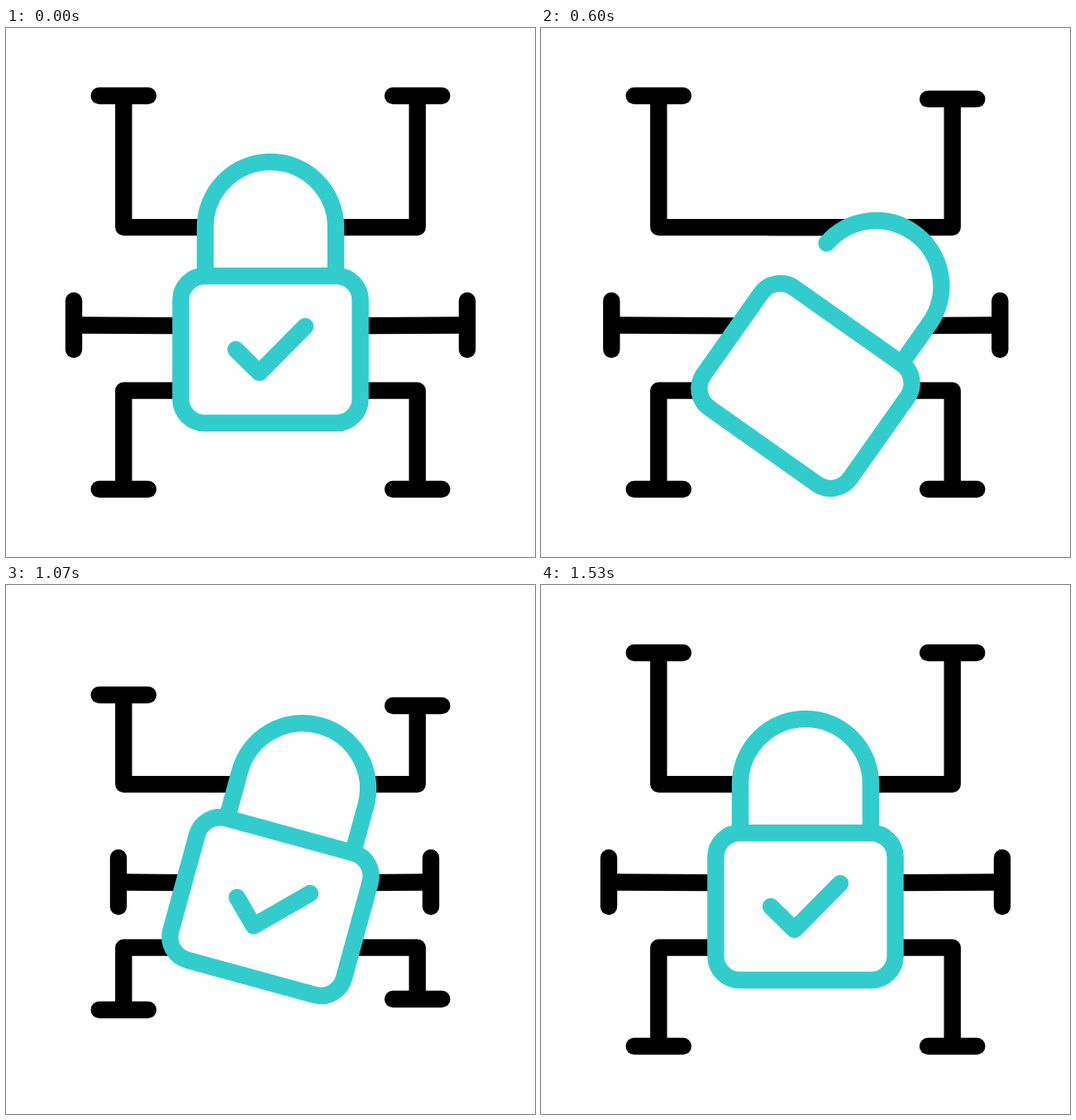
An HTML page with a canvas that plays this animation: 640 px wide and 640 px high, repeating every 1670 ms.

```html
<!DOCTYPE html>
<html lang="en">
<head>
<meta charset="utf-8">
<title>Swinging padlock</title>
<style>
  html, body { margin: 0; height: 100%; overflow: hidden; background: #fff; }
  canvas { display: block; width: 100vw; height: 100vh; object-fit: contain; }
</style>
</head>
<body>
<canvas id="stage" width="640" height="640"></canvas>
<script>
const ctx = document.getElementById("stage").getContext("2d");
const LOOP = 1670, STEP = 1000 / 30, LAST = 46, CENTER = 320;
const TEAL = "#33cccc", BLACK = "#000";

// Turning points of the swing: [step, degrees]
const swing = [[1.8, 0], [16.9, 40], [24.3, -40], [30.2, 20], [37.4, -10], [LAST, 0]];

function ease(n, from, to) {
  const u = Math.min(1, Math.max(0, (n - from) / (to - from)));
  return u * u * (3 - 2 * u);
}

// Rises from 0 to 1, holds, then falls back to 0.
const pulse = (n, rise, top, fall, end) => ease(n, rise, top) - ease(n, fall, end);

const swingAngle = n => swing.slice(1).reduce((sum, [step, angle], i) =>
  sum + (angle - swing[i][1]) * ease(n, swing[i][0], step), 0);

function line(...p) {
  ctx.beginPath();
  for (let i = 0; i < p.length; i += 2) ctx.lineTo(p[i], p[i + 1]);
}

// Strokes only the part of the current path between two fractions.
function strokePart(length, from, to) {
  if (to - from < 0.005) return;
  ctx.setLineDash([(to - from) * length, length * 3]);
  ctx.lineDashOffset = -from * length;
  ctx.stroke();
  ctx.setLineDash([]);
}

// A wire and its end bar; the wire is drawn inwards to the center.
function strokeArm(wire, x, y, halfWidth, halfHeight) {
  ctx.lineCap = "butt";
  line(x, y, ...wire);
  ctx.stroke();
  ctx.lineCap = "round";
  line(x - halfWidth, y - halfHeight, x + halfWidth, y + halfHeight);
  ctx.stroke();
}

// side and level are -1 or 1: left or right, top or bottom
function bentArm(n, side, level, start, release) {
  const reach = 54 + 6.5 * side - 3.5 * level;
  const x = CENTER + side * 177.7;
  const y = CENTER + level * (238 - reach * pulse(n, start, 24.2, release, LAST));
  const wireY = level < 0 ? 241.1 : 438.6;
  const innerX = CENTER + side * (level < 0 ? -45 : 80);
  strokeArm([x, wireY, innerX, wireY], x, y, 29.6, 0);
}

function straightArm(n, side, release) {
  const reach = 49 - 5 * side;
  const x = CENTER + side * (238 - reach * pulse(n, 16.9, 24.2, release, LAST));
  strokeArm([CENTER + side * 80, 360.4], x, 359.5, 0, 29.6);
}

function drawArms(n) {
  bentArm(n, -1, -1, 18, 35);
  bentArm(n, 1, -1, 16.9, 36.9);
  bentArm(n, -1, 1, 18, 38.9);
  bentArm(n, 1, 1, 18, 35);
  straightArm(n, -1, 38.9);
  straightArm(n, 1, 36.9);
}

function drawLock(n) {
  ctx.save();
  ctx.translate(CENTER, 389 + 45.2 * pulse(n, 0, 13, 17, 27.2));
  ctx.rotate(swingAngle(n) * Math.PI / 180);

  ctx.beginPath();
  ctx.moveTo(-79, -89);
  ctx.arc(0, -148, 79, Math.PI, 0);
  ctx.lineTo(79, -89);
  ctx.fill();
  strokePart(118 + 79 * Math.PI, 0.2 * pulse(n, 0, 14, 17, 22.5), 1);

  ctx.beginPath();
  ctx.roundRect(-108.6, -89, 217.2, 178, 29);
  ctx.fill();
  ctx.stroke();

  line(-42, 0, -13.5, 28, 42, -28);
  strokePart(118.8, 0, 1 - pulse(n, 0, 14, 18, 27.8));
  ctx.restore();
}

function drawSparks(n) {
  for (let i = -1; i <= 1; i++) {
    const x = 127 + 2 * i * i, y = 320 + 49 * i;
    line(x, y, x - 35 + 3.5 * i * i, y + 1 + 15.5 * i - 4.5 * i * i);
    strokePart(35.4, ease(n, 23, 28), ease(n, 19, 23));
  }
}

function draw(n) {
  ctx.fillStyle = "#fff";
  ctx.fillRect(0, 0, 640, 640);
  ctx.lineWidth = 20.4;
  ctx.lineJoin = "round";
  ctx.strokeStyle = BLACK;
  drawArms(n);
  ctx.strokeStyle = TEAL;
  drawLock(n);
  drawSparks(n);
}

function tick() {
  const time = performance.now() % LOOP;
  draw(Math.min(LAST, Math.floor((time + 5) / STEP)));
  requestAnimationFrame(tick);
}
tick();
</script>
</body>
</html>
```
